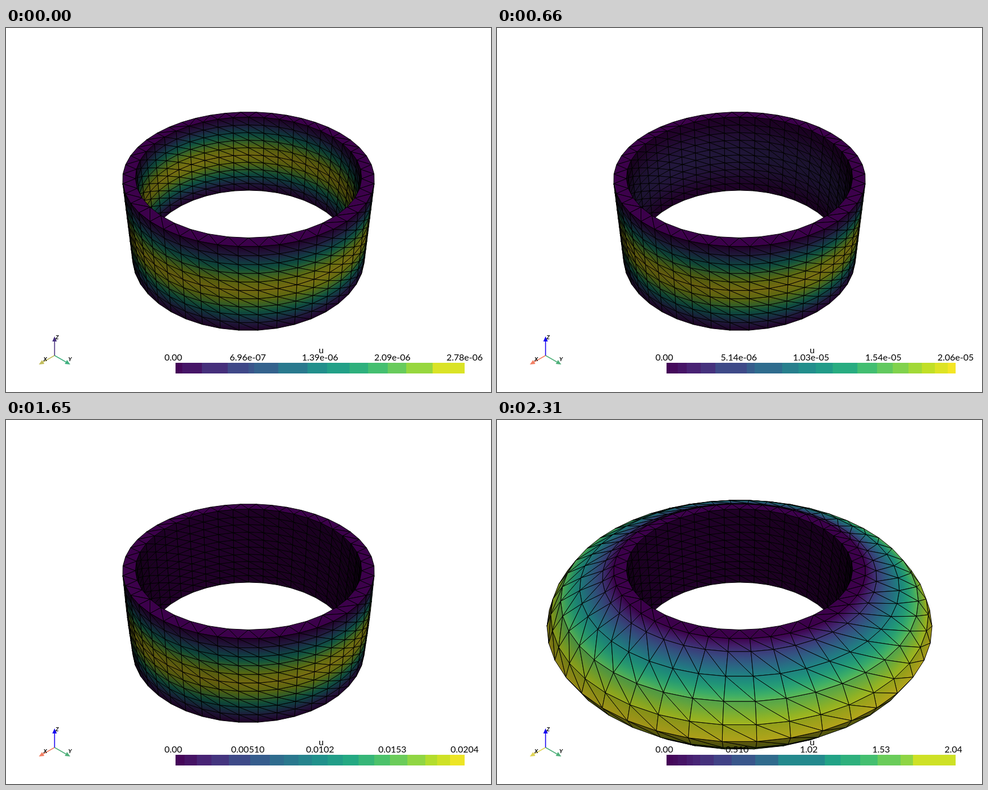
An HTML page with a canvas that plays this animation: 864x648 px, repeating every 2640 ms.

```html
<!DOCTYPE html>
<html lang="en">
<head>
<meta charset="utf-8">
<title>Ring under load</title>
<style>
  html, body { margin: 0; width: 100%; height: 100%; overflow: hidden; background: #fff; }
  canvas, svg { position: absolute; left: 0; top: 0; width: 864px; height: 648px; }
  text { font-family: Lato, "Open Sans", sans-serif; font-size: 16px; fill: #000; text-anchor: middle; }
  .axis { font-size: 10px; font-weight: bold; font-style: italic; }
</style>
</head>
<body>
<canvas id="stage" width="864" height="648"></canvas>
<svg viewBox="0 0 864 648">
  <g id="bar" shape-rendering="crispEdges"></g>
  <g id="labels"></g>
  <text x="561.5" y="579">u</text>
  <g id="axes"></g>
  <text class="axis" x="91" y="554">Z</text>
  <text class="axis" x="70" y="593">X</text>
  <text class="axis" x="114" y="593">Y</text>
</svg>
<script>
const STEP = 330;
const TAU = Math.PI * 2;
const ctx = document.getElementById('stage').getContext('2d');
const byId = id => document.getElementById(id);

// Each state: tick labels, peak displacement, outer and inner scalar level, axis colours, bar bands
const bandsMid = [318, 340, 366, 397, 435, 470, 495, 521, 545, 573, 600, 628, 656, 684, 715, 747, 768, 791];
const states = [
  { ticks: '0.00 6.96e-07 1.39e-06 2.09e-06 2.78e-06', peak: 0, outer: 1, inner: 1,
    axes: ['#c2bd5c', '#3fb07f', '#46307e'],
    bands: [308, 314, 349, 395, 432, 442, 485, 537, 572, 612, 645, 680, 713, 760] },
  { ticks: '0.00 8.97e-07 1.79e-06 2.69e-06 3.59e-06', peak: 0, outer: .9, inner: .77, noise: .26,
    axes: ['#f37f63', '#55b07c', '#4b3a8c'],
    bands: [306, 334, 371, 415, 429, 505, 540, 570, 600, 640, 676, 706, 733, 757, 773, 791] },
  { ticks: '0.00 5.14e-06 1.03e-05 1.54e-05 2.06e-05', peak: 0, outer: 1, inner: .14,
    axes: ['#f37f63', '#4fb07a', '#1400f0'],
    bands: [308, 322, 338, 363, 389, 445, 459, 508, 537, 568, 598, 642, 677, 705, 733, 757, 780, 803] },
  { ticks: '0.00 5.10e-05 0.000102 0.000153 0.000204', peak: .0002, outer: 1, inner: .014,
    axes: ['#f37f63', '#4fb07a', '#1400f0'], bands: bandsMid },
  { ticks: '0.00 0.000510 0.00102 0.00153 0.00204', peak: .002, outer: 1, inner: 0,
    axes: ['#b39b92', '#4fb07a', '#1400f0'], bands: bandsMid },
  { ticks: '0.00 0.00510 0.0102 0.0153 0.0204', peak: .0204, outer: 1, inner: 0,
    axes: ['#f37f63', '#4fb07a', '#1400f0'], bands: bandsMid },
  { ticks: '0.00 0.0510 0.102 0.153 0.204', peak: .204, outer: 1, inner: 0,
    axes: ['#f37f63', '#4fb07a', '#3a0f9a'],
    bands: [318, 340, 379, 424, 471, 499, 537, 570, 598, 638, 673, 701, 729, 755, 773, 791] },
  { ticks: '0.00 0.510 1.02 1.53 2.04', peak: 2.04, outer: 1, inner: 0,
    axes: ['#e0d455', '#4fb07a', '#1400f0'],
    bands: [308, 314, 322, 338, 349, 362, 386, 418, 460, 501, 584, 612, 647, 678, 719, 741] }
];

// Viridis colour map
const viridis = '440154 482475 414487 355f8d 2a788e 21918c 22a884 44bf70 7ad151 bddf26 fde725'
  .split(' ').map(h => [0, 2, 4].map(i => parseInt(h.substr(i, 2), 16)));
function shade(s, light = 1) {
  const t = Math.min(Math.max(s, 0), 1) * 10;
  const i = Math.min(Math.floor(t), 9);
  const c = viridis[i].map((v, n) => Math.round((v + (viridis[i + 1][n] - v) * (t - i)) * light));
  return `rgb(${c})`;
}

// Points are (right, toward the viewer, up); the outer radius is 1
const ROWS = 10, OUTER = 44, INNER = 40;
const HALF = .4, BORE = .9, UNIT = 3.58;
const DIST = 5.68, FOCAL = 324 / Math.tan(Math.PI / 12);
const SIN = 1 / Math.sqrt(3), COS = Math.sqrt(2 / 3);
const EYE = [0, DIST * COS, DIST * SIN];

// Radial and axial parts of the bulge, from rim to middle
const radial = [0, .16, .48, .755, .92, 1];
const axial = [0, .07, .105, .109, .046, 0];

const sub = (p, q) => p.map((v, i) => v - q[i]);
const dot = (p, q) => p[0] * q[0] + p[1] * q[1] + p[2] * q[2];
const cross = (p, q) => [
  p[1] * q[2] - p[2] * q[1], p[2] * q[0] - p[0] * q[2], p[0] * q[1] - p[1] * q[0]];
const unit = p => { const n = Math.hypot(...p) || 1; return p.map(v => v / n); };
const noise = (i, k) => { const v = Math.sin(i * 12.99 + k * 78.23) * 43758.55; return v - Math.floor(v); };

// Camera-relative lights: intensity, elevation, azimuth in degrees
const lights = [[.25, 0, 0], [.75, 50, 10], [.25, -75, 0], [.214, 0, 110], [.214, 0, -110]]
  .map(([power, el, az]) => {
    const e = el * TAU / 360, a = az * TAU / 360;
    const x = Math.cos(e) * Math.sin(a), y = Math.sin(e), z = Math.cos(e) * Math.cos(a);
    return { power, dir: [x, z * COS - y * SIN, y * COS + z * SIN] };
  });
const lit = n => Math.min(1, lights.reduce((sum, l) => sum + l.power * Math.max(0, dot(n, l.dir)), 0));

function project([b, a, z]) {
  const scale = FOCAL / (DIST - a * COS - z * SIN);
  return [432 + b * scale, 324 - (z * COS - a * SIN) * scale];
}

function wall(count, node) {
  return Array.from({ length: ROWS + 1 }, (_, k) =>
    Array.from({ length: count + 1 }, (_, i) => {
      const t = TAU * i / count - Math.PI / 4;
      const { r, z, s } = node(k, i % count);
      const p = [r * Math.sin(t), r * Math.cos(t), z];
      return { p, s, xy: project(p) };
    }));
}

function buildMesh(st) {
  const bulge = st.peak / UNIT;
  const height = k => HALF * (1 - 2 * k / ROWS);
  const out = wall(OUTER, k => {
    const m = Math.min(k, ROWS - k);
    return {
      r: 1 + bulge * radial[m],
      z: height(k) + bulge * axial[m] * Math.sign(ROWS / 2 - k),
      s: st.outer * Math.hypot(radial[m], axial[m])
    };
  });
  const inn = wall(INNER, (k, i) => ({
    r: BORE, z: height(k),
    s: radial[Math.min(k, ROWS - k)] * (st.inner + (st.noise || 0) * (noise(i, k) - .5))
  }));
  const tris = [];
  for (let k = 0; k < ROWS; k++) {
    const [o, o2, n, n2] = [out[k], out[k + 1], inn[k], inn[k + 1]];
    for (let i = 0; i < OUTER; i++) tris.push([o[i], o[i + 1], o2[i + 1]], [o[i], o2[i + 1], o2[i]]);
    for (let i = 0; i < INNER; i++) tris.push([n[i + 1], n[i], n2[i]], [n[i + 1], n2[i], n2[i + 1]]);
  }
  // Top rim: zip the two circles together
  const [o, n] = [out[0], inn[0]];
  for (let i = 0, j = 0; i < OUTER || j < INNER;) {
    if ((i + 1) / OUTER <= (j + 1) / INNER) tris.push([o[i], n[j], o[++i]]);
    else tris.push([o[i], n[j], n[++j]]);
  }
  return tris;
}

// Linear colour ramp that follows the scalar across one triangle
function ramp([a, b, c], light) {
  const lo = Math.min(a.s, b.s, c.s), hi = Math.max(a.s, b.s, c.s);
  const [x1, y1] = sub(b.xy, a.xy), [x2, y2] = sub(c.xy, a.xy);
  const det = x1 * y2 - x2 * y1;
  if (hi - lo < .002 || Math.abs(det) < .01) return shade((lo + hi) / 2, light);
  const d1 = b.s - a.s, d2 = c.s - a.s;
  const gx = (d1 * y2 - d2 * y1) / det, gy = (x1 * d2 - x2 * d1) / det;
  const len = gx * gx + gy * gy;
  const at = s => [a.xy[0] + gx / len * (s - a.s), a.xy[1] + gy / len * (s - a.s)];
  const fill = ctx.createLinearGradient(...at(lo), ...at(hi));
  for (let q = 0; q <= 4; q++) fill.addColorStop(q / 4, shade(lo + (hi - lo) * q / 4, light));
  return fill;
}

function drawMesh(st) {
  ctx.fillStyle = '#fff';
  ctx.fillRect(0, 0, 864, 648);
  ctx.strokeStyle = '#000';
  ctx.lineWidth = 1;
  ctx.lineJoin = 'round';
  const faces = [];
  for (const tri of buildMesh(st)) {
    const [a, b, c] = tri.map(v => v.p);
    const normal = unit(cross(sub(b, a), sub(c, a)));
    if (dot(normal, sub(EYE, a)) <= 0) continue;
    const mid = a.map((v, i) => (v + b[i] + c[i]) / 3);
    faces.push({ tri, light: lit(normal), far: Math.hypot(...sub(EYE, mid)) });
  }
  faces.sort((f, g) => g.far - f.far);
  for (const { tri, light } of faces) {
    ctx.beginPath();
    tri.forEach(v => ctx.lineTo(...v.xy));
    ctx.closePath();
    ctx.fillStyle = ramp(tri, light);
    ctx.fill();
    ctx.stroke();
  }
}

function drawBar(st) {
  const edges = [302, ...st.bands, 817];
  byId('bar').innerHTML = edges.slice(1).map((x, i) => {
    const s = ((x + edges[i]) / 2 - 302) / 515;
    return `<rect x="${edges[i]}" y="596" width="${x - edges[i]}" height="19" fill="${shade(s)}"/>`;
  }).join('');
  byId('labels').innerHTML = st.ticks.split(' ').map((label, i) => {
    const nudge = { 4: 4, 5: 3 }[label.length] || 0;
    return `<text x="${302 + 128.75 * i - nudge}" y="591.5">${label}</text>`;
  }).join('');
}

function drawAxes(st) {
  const arrow = (x, y, color) => {
    const [dx, dy] = unit([x - 86.5, y - 583]);
    const bx = x - dx * 9, by = y - dy * 9;
    return `<path d="M86.5 583L${bx} ${by}" stroke="${color}" stroke-width="1.6"/>` +
      `<path d="M${x} ${y}L${bx - dy * 4} ${by + dx * 4}L${bx + dy * 4} ${by - dx * 4}Z" fill="${color}"/>`;
  };
  const [x, y, z] = st.axes;
  byId('axes').innerHTML = arrow(58.5, 599, x) + arrow(114.5, 599, y) + arrow(86.5, 549, z);
}

let shown = -1;
const start = performance.now();
function tick() {
  const i = Math.floor((performance.now() - start) / STEP) % states.length;
  if (i !== shown) {
    shown = i;
    drawMesh(states[i]);
    drawBar(states[i]);
    drawAxes(states[i]);
  }
  requestAnimationFrame(tick);
}
tick();
</script>
</body>
</html>
```
